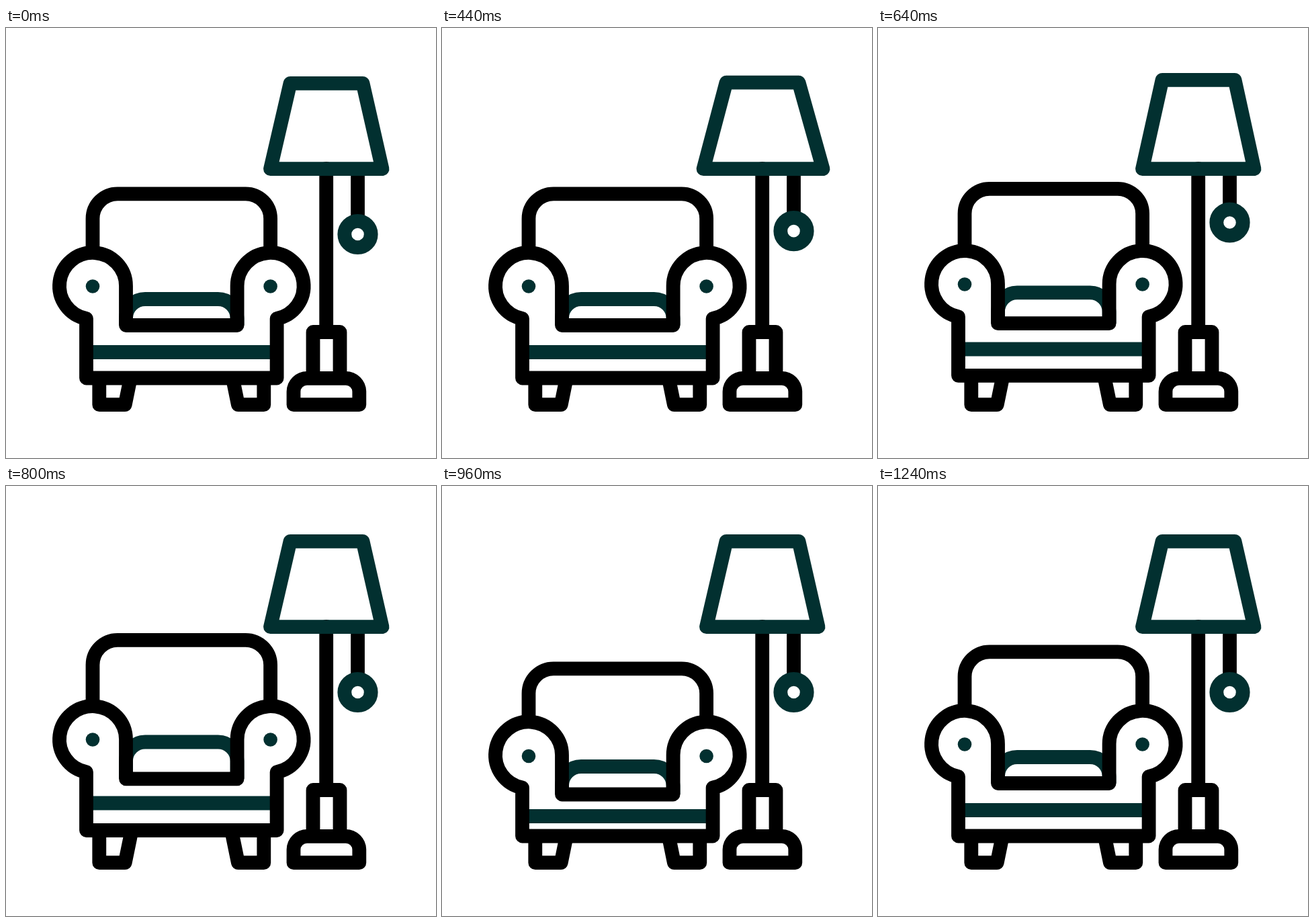
These frames come from a looping animation (640x640 px, 2 s). An HTML page with a canvas:

```html
<!DOCTYPE html>
<html lang="en">
<head>
<meta charset="utf-8">
<title>Armchair and lamp</title>
<style>
html, body { margin: 0; width: 100%; height: 100%; overflow: hidden; background: #fff; }
canvas { display: block; width: 640px; height: 640px; }
</style>
</head>
<body>
<canvas id="stage" width="640" height="640"></canvas>
<script>
const ctx = document.getElementById('stage').getContext('2d');
const LOOP = 2000, STEP = 40;
const BLACK = '#000', TEAL = '#023030', LINE = 20.8;
const MIRROR = 522.6; // sum of x for mirrored armchair points
const LAMP_KEYS = [120, 330, 560, 720];
const CHAIR_KEYS = [520, 800, 960, 1240];

// Offset running 0 -> a -> b -> 0 across four key times
function swing(t, keys, a, b) {
  const values = [0, a, b, 0];
  if (t <= keys[0] || t >= keys[3]) return 0;
  let i = 0;
  while (t > keys[i + 1]) i++;
  const k = (t - keys[i]) / (keys[i + 1] - keys[i]);
  return values[i] + (values[i + 1] - values[i]) * k;
}

function stroke(path, color) {
  ctx.strokeStyle = color;
  ctx.stroke(new Path2D(path));
}

function dot(x, y, r) {
  ctx.fillStyle = TEAL;
  ctx.beginPath();
  ctx.arc(x, y, r, 0, Math.PI * 2);
  ctx.fill();
}

function drawLamp(t) {
  const move = (a, b) => swing(t, LAMP_KEYS, a, b);
  const top = 82.3 + move(7, -10);
  const left = 393.5 + move(-8.5, 0);
  const right = 560 + move(13.5, 0);
  const bob = 307 + move(22.8, -35);

  ctx.lineCap = 'round';
  stroke('M476.7 209.3V452', BLACK);
  ctx.lineCap = 'butt';
  stroke(`M523.5 210V${bob - 20}`, BLACK);
  stroke('M457 521V452.5H497V521', BLACK);
  stroke('M428 560.7V541A20 20 0 0 1 448 521.3H505.8A20 20 0 0 1 525.8 541V560.7Z', BLACK);
  stroke(`M423 ${top}H531L${right} 209.7H${left}Z`, TEAL);

  ctx.strokeStyle = TEAL;
  ctx.beginPath();
  ctx.arc(523.5, bob, 19.7, 0, Math.PI * 2);
  ctx.stroke();
}

function drawChair(t) {
  const move = (a, b) => swing(t, CHAIR_KEYS, a, b);
  const back = 246.8 + move(-17.5, 25);
  const arm = move(-6.7, 16.5);
  const eye = 384.5 + move(-7, 17.5);
  const cushion = 403.5 + move(-22.5, 14);
  const stripe = 482.5 + move(-10.5, 9);
  const lift = move(-8.5, 0);
  const base = 521 + lift;
  const seat = 442.5 + arm, hub = 384 + arm, tail = 432.5 + arm;
  const m = x => MIRROR - x;

  ctx.lineCap = 'butt';
  stroke(`M178.5 ${seat}V${cushion + 28.5}A28.5 28.5 0 0 1 207 ${cushion}` +
    `H${m(207)}A28.5 28.5 0 0 1 ${m(178.5)} ${cushion + 28.5}V${seat}`, TEAL);
  stroke(`M125 ${stripe}H${m(125)}`, TEAL);

  stroke(`M129 ${334.5 + arm}V${back + 37}A37 37 0 0 1 166 ${back}` +
    `H${m(166)}A37 37 0 0 1 ${m(129)} ${back + 37}V${334.5 + arm}`, BLACK);

  stroke(`M119.5 ${base}V${tail}A49.5 49.5 0 1 1 178.5 ${hub}V${seat}` +
    `H${m(178.5)}V${hub}A49.5 49.5 0 1 1 ${m(119.5)} ${tail}V${base}Z`, BLACK);

  const knee = 185.3 - lift * 0.215;
  for (const side of [x => x, m]) {
    stroke(`M${side(138.8)} ${base}V560.7H${side(177.2)}L${side(knee)} ${base}`, BLACK);
    dot(side(129), eye, 10.3);
  }
}

function frame(now) {
  const t = Math.floor((now % LOOP) / STEP) * STEP;
  ctx.fillStyle = '#fff';
  ctx.fillRect(0, 0, 640, 640);
  ctx.lineWidth = LINE;
  ctx.lineJoin = 'round';
  drawChair(t);
  drawLamp(t);
}

let start = null;
function tick(now) {
  if (start === null) start = now;
  frame(now - start);
  requestAnimationFrame(tick);
}
frame(0);
requestAnimationFrame(tick);
</script>
</body>
</html>
```
